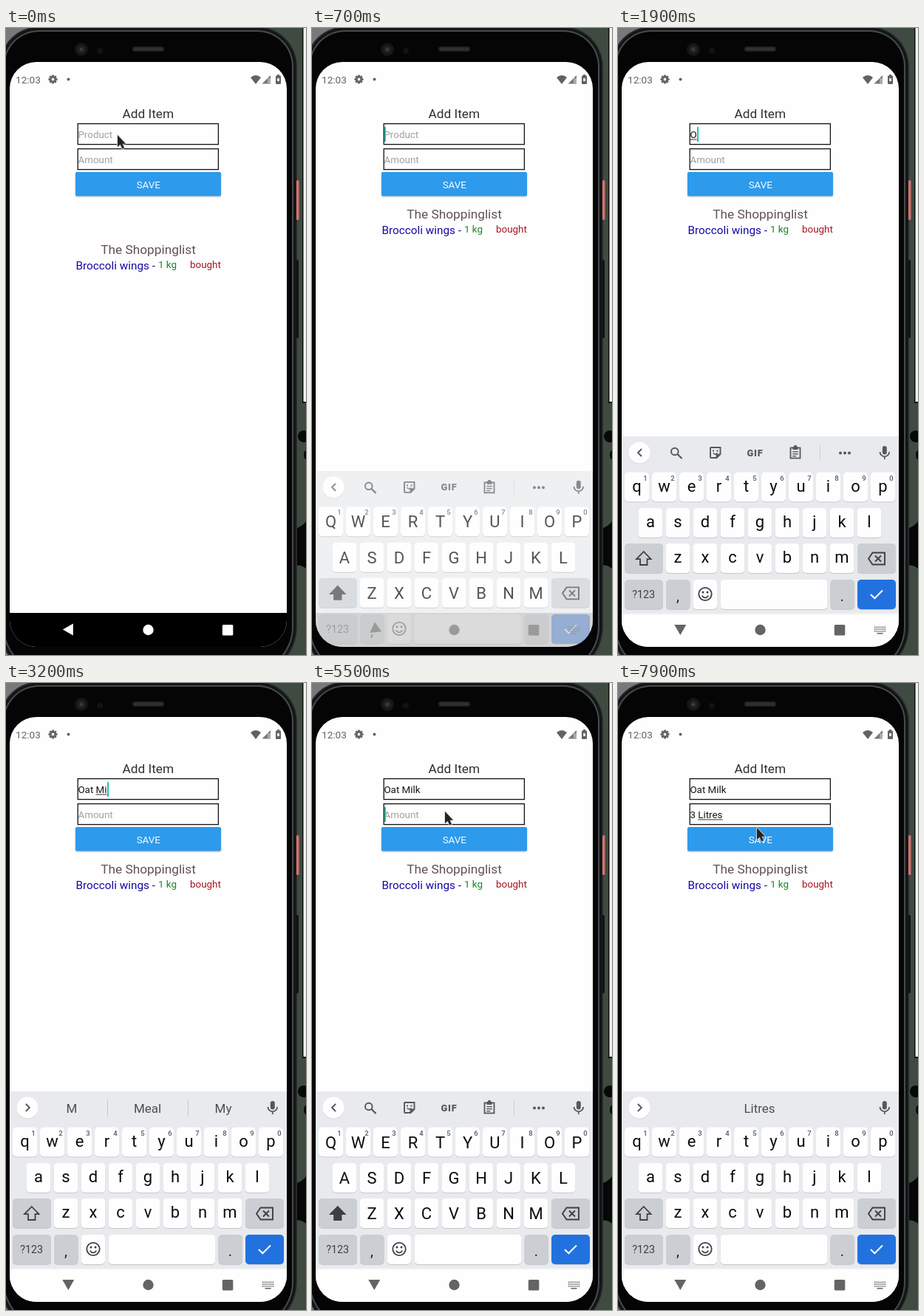
Write an HTML page with a canvas that moves like this. It is 406 px wide and 849 px high and loops after 8 s.

```html
<!DOCTYPE html>
<html lang="en">
<head>
<meta charset="utf-8">
<title>Shopping list</title>
<style>
html, body { margin: 0; width: 100%; height: 100%; overflow: hidden; background: #000; }
canvas { display: block; width: 406px; height: 849px; }
</style>
</head>
<body>
<canvas id="stage"></canvas>
<script>
const W = 406, H = 849, LOOP = 8000, STEP = 100;
const ratio = window.devicePixelRatio || 1;

function prepare(canvas) {
  canvas.width = W * ratio;
  canvas.height = H * ratio;
  const ctx = canvas.getContext('2d');
  ctx.scale(ratio, ratio);
  return ctx;
}

const stage = prepare(document.getElementById('stage'));
const layer = prepare(document.createElement('canvas'));
let c = stage;

const WHITE = '#fefefe', ICON = '#55585c', DARK = '#3d4043', TEAL = '#1fc4b0';
const clamp = v => Math.max(0, Math.min(1, v));

// Each entry changes part of the state from its time on.
const EVENTS = [
  [0, { product: '', amount: '', mark: 0, focus: '', caret: false, caps: true, list: 48, words: null, mouse: [151, 145] }],
  [400, { focus: 'product', caret: true, mouse: null }],
  [500, { list: 0 }],
  [1500, { caret: false }],
  [1700, { product: 'O', mark: 1, caret: true }],
  [1900, { caps: false }],
  [2000, { product: 'Oa', mark: 2, words: ['O', 'Oh', 'On'] }],
  [2100, { product: 'Oat', mark: 2 }],
  [2300, { mark: 3 }],
  [2400, { words: ['Oat', 'Oats', 'Oath'] }],
  [2700, { product: 'Oat ', mark: 0, caps: true }],
  [2900, { product: 'Oat M', mark: 1 }],
  [3000, { caps: false }],
  [3100, { words: ['M', 'Meal', 'My'] }],
  [3200, { product: 'Oat Mi', mark: 2 }],
  [3400, { product: 'Oat Mil', mark: 3 }],
  [3500, { words: ['Mil', 'Milk', 'Miles'] }],
  [3600, { product: 'Oat Milk', mark: 4 }],
  [3800, { words: ['Milk', "Milk's", 'Milky'] }],
  [4100, { caret: false }],
  [4600, { caret: true, mouse: [201, 83] }],
  [4700, { mouse: [205, 128] }],
  [4800, { mouse: [204, 199] }],
  [4900, { mouse: [190, 184] }],
  [5000, { mouse: [180, 174] }],
  [5200, { caret: false }],
  [5500, { focus: 'amount', caret: true, mark: 0, caps: true, words: null }],
  [5700, { amount: '3', mouse: null }],
  [5800, { amount: '3 ', caps: false }],
  [6000, { words: ['or', 'days', 'am'] }],
  [6300, { amount: '3 L', mark: 1 }],
  [6400, { amount: '3 Li', mark: 2 }],
  [6600, { amount: '3 Lit', mark: 3 }],
  [6700, { words: ['Li', 'Like', 'Lit'] }],
  [6900, { amount: '3 Litr', mark: 4, words: ['Lit', 'Little', 'Litre'] }],
  [7000, { amount: '3 Litre', mark: 5 }],
  [7100, { amount: '3 Litres', mark: 5 }],
  [7300, { mark: 6 }],
  [7400, { words: ['', 'Litres', ''] }],
  [7800, { caret: false, mouse: [279, 199] }],
  [7900, { mouse: [188, 196] }]
];

function stateAt(t) {
  const s = {};
  for (const [at, patch] of EVENTS) if (at <= t) Object.assign(s, patch);
  return s;
}

function text(str, x, y, size, color, align = 'left', weight = 400) {
  c.font = `${weight} ${size}px Roboto, "Noto Sans", sans-serif`;
  c.textAlign = align;
  c.fillStyle = color;
  c.fillText(str, x, y);
}

function rect(x, y, w, h, color) {
  c.fillStyle = color;
  c.fillRect(x, y, w, h);
}

function round(x, y, w, h, r, color) {
  c.beginPath();
  c.roundRect(x, y, w, h, r);
  c.fillStyle = color;
  c.fill();
}

function disc(x, y, r, color) {
  c.beginPath();
  c.arc(x, y, r, 0, 7);
  c.fillStyle = color;
  c.fill();
}

function ellipse(x, y, rx, ry, color) {
  c.beginPath();
  c.ellipse(x, y, rx, ry, 0, 0, 7);
  c.fillStyle = color;
  c.fill();
}

function ring(x, y, r, color, width, from = 0, to = 7) {
  c.beginPath();
  c.arc(x, y, r, from, to);
  c.strokeStyle = color;
  c.lineWidth = width;
  c.stroke();
}

function fillPath(d, color) {
  c.fillStyle = color;
  c.fill(new Path2D(d));
}

function strokePath(d, color, width) {
  c.strokeStyle = color;
  c.lineWidth = width;
  c.stroke(new Path2D(d));
}

// Phone outline, drawn smaller by the given inset.
function body(inset, color) {
  const r = 68 - inset;
  round(-9 + inset, -2 + inset, 403 - 2 * inset, 881 - 2 * inset, [r - 14, r - 14, r, r], color);
}

function drawPhone() {
  rect(0, 0, W, H, '#3f4b40');
  rect(0, 0, 60, H, '#77797a');
  rect(401, 0, 5, 508, '#0b0d0b');
  rect(402.5, 0, 4, 506, '#f0f1ee');
  ellipse(403, 553, 8, 8, '#070907');
  ellipse(406, 578, 3, 6, '#070907');
  fillPath('M392 678Q402 674 406 668V732Q399 726 392 728Z', '#060706');

  body(0, '#2c2f31');
  body(1.5, '#131516');
  body(5, '#484b4d');
  body(7, '#050506');
  round(393, 206, 3.5, 54, 1.5, '#d3726d');
  round(392.5, 314, 3.5, 106, 1.5, '#101213');

  round(171, 25, 43, 7, 3.5, '#222324');
  round(173, 27, 39, 3, 1.5, '#303131');
  disc(102, 29, 9, '#151617');
  disc(102, 29, 5, '#222427');
  disc(102, 29, 2, '#3d4045');
  disc(127, 31, 4, '#111214');
}

function drawStatus() {
  const gray = '#626262';
  text('12:03', 13, 75, 13.6, gray);
  for (let i = 0; i < 8; i++) {
    c.save();
    c.translate(63.5, 69.5);
    c.rotate(i * Math.PI / 4);
    rect(-1.4, -6, 2.8, 4, gray);
    c.restore();
  }
  ring(63.5, 69.5, 3.4, gray, 2.4);
  disc(84.5, 69.5, 2, gray);
  fillPath('M331 67Q338 61 345 67L338 76Z', gray);
  fillPath('M346.5 75.5L358 64V75.5Z', '#777');
  rect(354, 68, 4, 7.5, '#aaa');
  round(365, 64.5, 7, 11.5, 1, gray);
  rect(367, 63, 3, 2, gray);
  rect(367, 68, 3, 4, '#e6e6e6');
}

function drawField(s, name, hint, y) {
  c.strokeStyle = '#111';
  c.lineWidth = 1.3;
  c.strokeRect(97.2, y + .6, 190.2, 28);
  const value = s[name], left = 97.4, base = y + 20;
  text(value || hint, left, base, 13.4, value ? '#161616' : '#a1a1a1');
  if (s.focus !== name) return;
  const widthOf = str => str ? c.measureText(str).width : 0;
  const end = left + widthOf(value);
  if (s.mark && value) {
    const start = left + widthOf(value.slice(0, value.length - s.mark));
    rect(start, base + 1.5, end - start, 1, '#333');
  }
  if (s.caret) rect(Math.round(end + .2), y + 5, 2, 20, TEAL);
}

function drawApp(s) {
  text('Add Item', 192.3, 122, 17.3, '#303033', 'center');
  drawField(s, 'product', 'Product', 129);
  drawField(s, 'amount', 'Amount', 163);
  c.save();
  c.shadowColor = 'rgba(0,0,0,.3)';
  c.shadowBlur = 2 * ratio;
  c.shadowOffsetY = ratio;
  round(94, 195, 197, 32.5, 2, '#2e9aeb');
  c.restore();
  text('SAVE', 192.8, 217, 13.4, '#f6fbff', 'center');

  const y = s.list;
  text('The Shoppinglist', 192.5, 258 + y, 17.3, '#62505c', 'center');
  text('Broccoli wings -', 94.5, 279 + y, 15.3, '#1308a6');
  text('1 kg', 206, 277 + y, 13.4, '#168526');
  text('bought', 249, 277 + y, 13.4, '#aa1020');
}

function drawToolbar() {
  ring(76.8, 573.5, 4.8, ICON, 1.9);
  strokePath('M80.5 577L86.5 583', ICON, 2.3);

  strokePath('M126 568H138.5V577L133.5 582H126Q125 582 125 581V569Q125 568 126 568Z', ICON, 1.9);
  fillPath('M132.5 582V576.5H139Z', ICON);
  rect(128, 571.5, 2, 2, ICON);
  rect(133.5, 571.5, 2, 2, ICON);
  ring(131.5, 574, 3, ICON, 1.4, .5, 2.7);

  c.save();
  c.letterSpacing = '.8px';
  text('GIF', 185.5, 579.5, 12.8, ICON, 'center', 900);
  c.restore();

  c.strokeStyle = ICON;
  c.lineWidth = 1.8;
  c.strokeRect(233.5, 568.5, 13, 14);
  rect(236.5, 567, 7, 4, ICON);
  disc(240, 567, 2.2, ICON);
  for (const [y, w] of [[573, 7.5], [576, 7.5], [579, 5]]) rect(236.3, y, w, 1.4, ICON);

  rect(273, 565, 1, 21, '#cfd2d6');
  for (const x of [301, 307, 313]) disc(x, 575.5, 2, ICON);
}

function drawWords(words) {
  [89, 191.5, 294].forEach((x, i) => text(words[i], x, 582, 17, '#4b4e52', 'center'));
  if (words[0]) for (const x of [137, 246]) rect(x, 564, 1, 23, '#c5c8cc');
}

function key(x, y, w, color = WHITE) {
  round(x, y + .8, w, 40, 5, '#b9bcc1');
  round(x, y, w, 40, 5, color);
}

function letterRow(letters, first, y, caps) {
  [...letters].forEach((ch, i) => {
    const x = first + i * 37;
    key(x - 16.5, y, 33);
    text(caps ? ch : ch.toLowerCase(), x, y + (caps ? 28 : 26), 22, '#0c0c0d', 'center');
  });
}

function drawKeyboard(s) {
  const gray = '#cbced3';
  rect(5, 553, 375, 300, '#e8eaed');
  disc(29, 576, 14.5, '#d4d7da');
  disc(29, 575, 14.5, WHITE);
  strokePath(s.words ? 'M26.8 570L31.8 575L26.8 580' : 'M32 570L27 575L32 580', ICON, 1.9);
  if (s.words) drawWords(s.words);
  else drawToolbar();
  round(357.8, 566, 6, 11.5, 3, ICON);
  strokePath('M354.5 574A6.3 6.3 0 0 0 367.1 574M360.8 580V584', ICON, 1.8);

  letterRow('QWERTYUIOP', 25.5, 601.5, s.caps);
  for (let i = 0; i < 10; i++)
    text((i + 1) % 10, 37 + i * 37, 612.5, 9.5, ICON, 'center', 500);
  letterRow('ASDFGHJKL', 44, 650, s.caps);
  letterRow('ZXCVBNM', 81, 698, s.caps);

  key(9, 698, 52, gray);
  const shift = 'M34.8 709L44.5 719.2H39.5V727H30V719.2H25Z';
  if (s.caps) fillPath(shift, DARK);
  strokePath(shift, DARK, 1.8);
  key(324, 698, 52, gray);
  strokePath('M339 718.5L344.5 710.5H361V726.5H344.5ZM348 714.5L356 722.5M356 714.5L348 722.5', DARK, 1.9);

  key(9, 747, 52, gray);
  text('?123', 34.7, 772, 14.3, DARK, 'center');
  key(65, 747, 32.5, gray);
  text(',', 81, 776, 20, '#222', 'center');
  key(101.5, 747, 32.5, WHITE);
  ring(118, 766.5, 8.7, DARK, 1.8);
  disc(115, 764, 1.5, DARK);
  disc(121, 764, 1.5, DARK);
  ring(118, 767, 4.4, DARK, 1.8, .35, 2.8);
  key(138.5, 747, 145);
  key(287.5, 747, 32.5, gray);
  text('.', 303.5, 776, 20, '#222', 'center');
  key(324, 747, 52, '#2172df');
  strokePath('M342 767L347.3 772.3L358 761.5', '#fff', 2);
}

function drawNav(color, turn, withSwitch) {
  c.save();
  c.translate(84.3, 814.5);
  c.rotate(-turn * Math.PI / 2);
  fillPath('M-7.5 0L6.5 -8V8Z', color);
  c.restore();
  disc(192.5, 815, 7.2, color);
  round(292.8, 808, 14.5, 14.5, 1.5, color);
  if (!withSwitch) return;
  for (let r = 0; r < 3; r++)
    for (let i = 0; i < 6; i++) rect(347 + i * 2.7, 810.5 + r * 2.8, 1.6, 1.6, color);
  rect(350.5, 819, 8, 1.5, color);
}

function drawMouse([x, y]) {
  c.save();
  c.translate(x, y);
  c.lineJoin = 'round';
  const arrow = 'M0 0V16L3.7 12.8L6.3 18.5L9 17.3L6.5 11.7H11Z';
  strokePath(arrow, '#d9d9d9', 1.6);
  fillPath(arrow, '#242426');
  c.restore();
}

// The keyboard fades in as one flat picture while it slides up.
function raiseKeyboard(s, rise) {
  c = layer;
  c.clearRect(0, 0, W, H);
  c.save();
  c.translate(0, 160 * (1 + Math.cos(Math.PI * rise)));
  drawKeyboard(s);
  c.restore();
  c = stage;
  c.globalAlpha = Math.pow(rise, 1.25);
  c.drawImage(layer.canvas, 0, 0, W, H);
  c.globalAlpha = 1;
  rect(5, 792, 375, 46, rise < .7 ? 'rgba(0,0,0,.45)' : `rgba(254,254,254,${rise < 1 ? .55 : 1})`);
  if (rise === 1) rect(5, 792.5, 375, 1, '#e1e3e5');
}

function draw(t) {
  const s = stateAt(t);
  const rise = clamp((t - 400) / 400);
  drawPhone();
  c.save();
  c.beginPath();
  c.roundRect(5, 46, 375, 792, 36);
  c.clip();
  rect(5, 46, 375, 792, WHITE);
  drawStatus();
  drawApp(s);
  rect(5, 792, 375, 46, '#000');
  if (rise > 0) raiseKeyboard(s, rise);
  const shade = Math.round(255 - 155 * clamp(rise * 1.4 - .4));
  drawNav(`rgb(${shade},${shade},${shade})`, clamp((t - 600) / 250), rise >= .5);
  c.restore();
  if (s.mouse) drawMouse(s.mouse);
}

const began = performance.now();
function tick(now) {
  const t = Math.max(0, now - began) % LOOP;
  draw(Math.floor(t / STEP) * STEP);
  requestAnimationFrame(tick);
}
draw(0);
requestAnimationFrame(tick);
</script>
</body>
</html>
```
